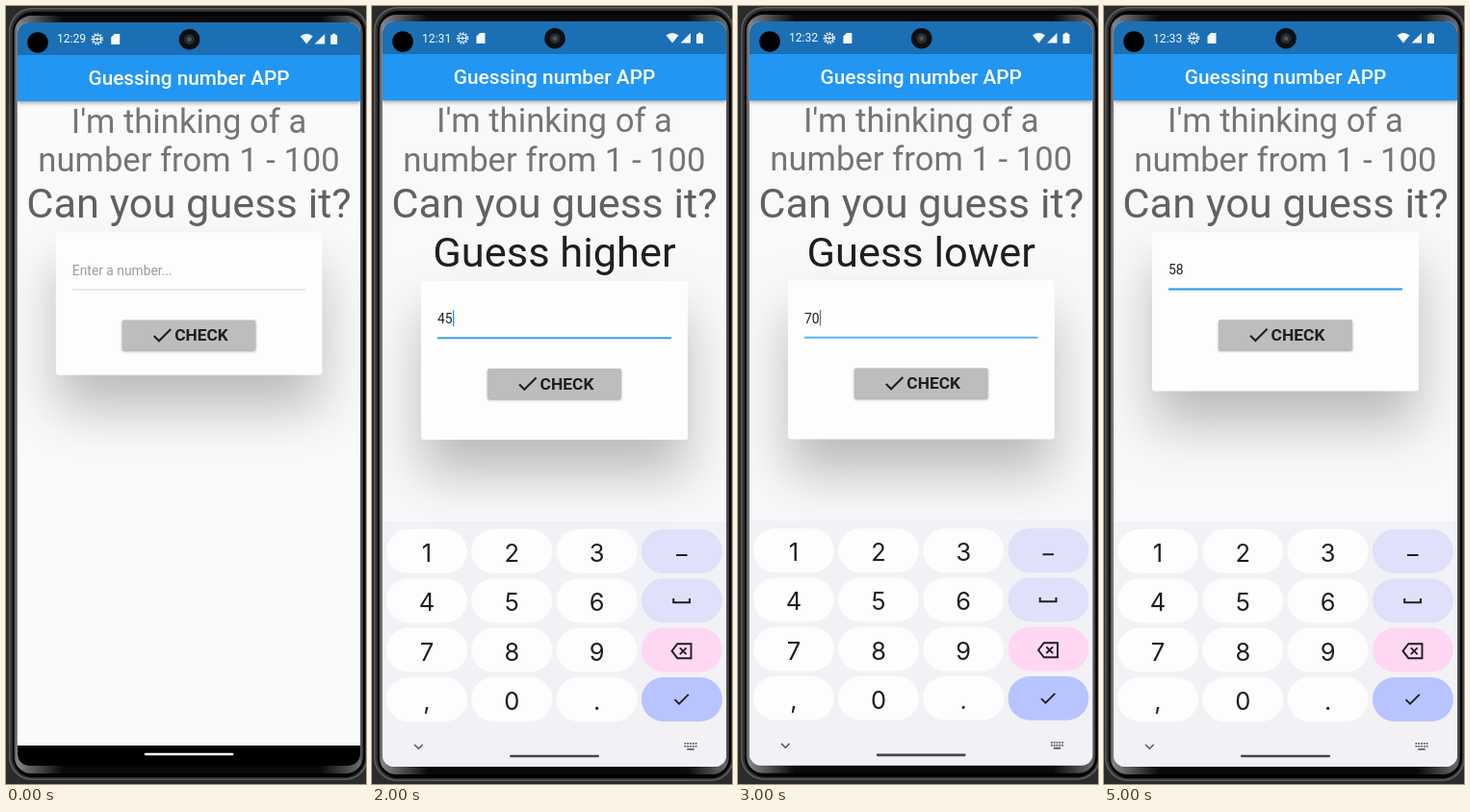
These frames come from a looping animation (374 px wide and 809 px high, 6 s). An HTML page with a canvas:

```html
<!DOCTYPE html>
<html lang="en">
<head>
<meta charset="utf-8">
<title>Guessing number</title>
<style>
  html, body { margin: 0; width: 100%; height: 100%; overflow: hidden; background: #2b2b2b; }
  canvas { display: block; }
</style>
</head>
<body>
<canvas id="stage" width="374" height="809"></canvas>
<script>
const ctx = document.getElementById('stage').getContext('2d');
const LEFT = 11, TOP = 16, WIDTH = 357, HEIGHT = 775, MIDDLE = 189.5;
const DP = 0.868; // stage pixels per device unit
const INK = '#1f1f1f', BLUE = '#2196f3';

// x, y, scale: where the phone sits; button and height are measured from the card's top
const scenes = [
  { x: 12, y: 17, scale: .9975, time: '12:29', line: '#d8d8d8', button: 91, height: 148 },
  { x: 11, y: 19, scale: .9947, time: '12:30', line: '#e57373', button: 109.5, height: 165, error: 'Enter a number!', keys: true },
  { x: 11, y: 16, scale: 1, time: '12:31', line: '#3c9fe6', button: 91, height: 165, message: 'Guess higher', value: '45', caret: BLUE, keys: true },
  { x: 12, y: 16, scale: .9985, time: '12:32', line: '#5db2f5', button: 91, height: 165, message: 'Guess lower', value: '70', caret: '#777', keys: true },
  { x: 11, y: 14.7, scale: 1, time: '12:33', line: '#55aef5', button: 91, height: 199, message: 'You got it right', value: '58', caret: BLUE, retry: true, weakSignal: true, keys: true },
  { x: 10, y: 16, scale: 1, time: '12:33', line: BLUE, button: 91, height: 165, value: '58', keys: true }
];

const icons = {
  check: 'M9 16.17L4.83 12l-1.42 1.41L9 19 21 7l-1.41-1.41z',
  restore: 'M14 12c0-1.1-.9-2-2-2s-2 .9-2 2 .9 2 2 2 2-.9 2-2zm-2-9c-4.97 0-9 4.03-9 9H0l4 4 4-4H5c0-3.87 3.13-7 7-7s7 3.13 7 7-3.13 7-7 7c-1.51 0-2.91-.49-4.06-1.3l-1.42 1.44C8.04 20.3 9.94 21 12 21c4.97 0 9-4.03 9-9s-4.03-9-9-9z'
};

function box(x, y, w, h, color, radius = 0) {
  ctx.fillStyle = color;
  ctx.beginPath();
  ctx.roundRect(x, y, w, h, radius);
  ctx.fill();
}

function disc(x, y, r, color) {
  box(x - r, y - r, 2 * r, 2 * r, color, r);
}

function text(string, x, y, size, color, { weight = 400, align = 'left', family = 'Roboto' } = {}) {
  ctx.font = `${weight} ${size}px ${family}, sans-serif`;
  ctx.textAlign = align;
  ctx.fillStyle = color;
  ctx.fillText(string, x, y);
}

function stroke(path, color, width = 2) {
  ctx.strokeStyle = color;
  ctx.lineWidth = width;
  ctx.stroke(new Path2D(path));
}

function fill(path, color) {
  ctx.fillStyle = color;
  ctx.fill(new Path2D(path));
}

function icon(name, x, y, size) {
  ctx.save();
  ctx.translate(x, y);
  ctx.scale(size / 24, size / 24);
  fill(icons[name], INK);
  ctx.restore();
}

function shaded(offset, blur, alpha, draw) {
  ctx.save();
  ctx.shadowColor = `rgba(0,0,0,${alpha})`;
  ctx.shadowOffsetY = offset;
  ctx.shadowBlur = blur;
  draw();
  ctx.restore();
}

function drawPhone() {
  box(2, 1, 374, 805, '#5c5c5c', 24);
  box(3.5, 2.5, 371, 802, '#303030', 23);
  box(6, 5, 367, 798, '#000', 21);
  // reflections along the curved sides of the glass
  const glass = ctx.createLinearGradient(7, 0, 371, 0);
  glass.addColorStop(0, '#444');
  glass.addColorStop(.01, '#858585');
  glass.addColorStop(.14, '#0a0a0a');
  glass.addColorStop(.88, '#0a0a0a');
  glass.addColorStop(.99, '#6a6a6a');
  glass.addColorStop(1, '#333');
  box(7.5, 9, 363.5, 790, glass, 18);
}

function drawStatusBar({ time, weakSignal }) {
  const white = '#f4f8fc';
  box(LEFT, TOP, WIDTH, 34, '#1b6fb5');
  text(time, 52, 37.5, 14 * DP, white);

  ctx.setLineDash([1.6, 1.54]);
  stroke('M99.5 33.5a5.5 5.5 0 1 1-11 0a5.5 5.5 0 1 1 11 0', white, 1.5);
  ctx.setLineDash([]);
  stroke('M98 33.5a4 4 0 1 1-8 0a4 4 0 1 1 8 0M90 33.5h8M94 31.5v4', white, 1.2);
  fill('M112 28h5.5v11h-9v-7.5z', white);

  fill('M305.5 30.5Q312 25.5 318.5 30.5L312 38.5z', white);
  if (weakSignal) {
    stroke('M330.3 29.5v8.3h-8z', white, 1.2);
    fill('M326 34v4h-4z', white);
  } else {
    fill('M331 28v10.5h-10.5z', white);
  }
  box(337, 29, 7, 10, white, 1);
  box(339, 27.8, 3, 2, white);

  disc(32, 37, 10.8, '#000');
  disc(190, 33.7, 10.8, '#0c0f12');
  disc(190, 33.7, 5.5, '#262b30');
  disc(190, 33.7, 2.5, '#4c5359');
}

function drawButton(y, name, label) {
  shaded(1.5, 2.5, .35, () => box(120, y, 139, 31.3, '#bdbdbd', 1.7));
  const size = 20 * DP, iconSize = 30 * DP;
  ctx.font = `700 ${size}px Roboto, sans-serif`;
  const start = MIDDLE - (iconSize + ctx.measureText(label).width) / 2;
  icon(name, start, y + 15.7 - iconSize / 2, iconSize);
  text(label, start + iconSize, y + 21.8, size, INK, { weight: 700 });
}

function drawCard(scene) {
  const { line, button, height, value, caret, error, message, retry } = scene;
  const y = message ? 286 : 235.3;
  shaded(35, 54, .25, () => box(51, y, 277, height, '#fff', 3));
  box(51, y, 277, height, '#fdfdfd', 3);

  text(value || 'Enter a number...', 68, y + 44, 16 * DP, value ? INK : '#9b9b9b');
  if (caret) box(84, y + 30.5, 1.3, 16.5, caret);
  const thickness = value ? 2 : 1.2;
  box(68, y + 59.3 - thickness / 2, 243, thickness, line);
  if (error) text(error, 68, y + 76.3, 12 * DP, '#d32f2f');

  drawButton(y + button, 'check', 'CHECK');
  if (retry) drawButton(y + button + 41.4, 'restore', 'Try Again');
}

function drawKeyboard() {
  box(LEFT, 536, WIDTH, 255, '#f2f1f6');
  const rows = ['123', '456', '789', ',0.'];
  const sideColors = ['#dfe0fa', '#dfe0fa', '#ffd7f2', '#b8c4ff'];
  rows.forEach((row, r) => {
    const y = 544 + r * 51.3;
    for (let c = 0; c < 4; c++) {
      const x = 15 + c * 88.3;
      box(x, y, 84, 46, c < 3 ? '#fdfdfd' : sideColors[r], 23);
      if (c < 3) text(row[c], x + 42, y + 33.9, 25.5, INK, { align: 'center', family: 'Inter' });
    }
  });
  stroke('M316 571h11.5', INK);
  stroke('M313.2 616v4.2h16.8v-4.2', INK);
  stroke('M317.3 663.2h14.2v15h-14.2l-5.8-7.5zM319.8 667.3l6.8 6.8m0-6.8l-6.8 6.8', INK, 1.9);
  stroke('M314.5 721.2l4.5 4.5l9.8-9.8', INK, 1.9);

  stroke('M44 768l4.3 4.3l4.3-4.3', '#55555a', 1.5);
  for (let i = 0; i < 5; i++) {
    box(324.5 + i * 2.8, 766, 1.8, 1.8, '#606066');
    box(324.5 + i * 2.8, 769, 1.8, 1.8, '#606066');
  }
  box(327.3, 772, 7.4, 1.8, '#606066');
  box(143, 778.7, 93, 2.6, '#45454a', 1.3);
}

function drawNavigation() {
  box(LEFT, 770, WIDTH, 21, '#000');
  box(143, 777.6, 93, 2.6, '#fff', 1.3);
}

function drawScene(scene) {
  ctx.resetTransform();
  box(0, 0, 374, 809, '#2b2b2b');
  ctx.save();
  ctx.translate(scene.x, scene.y);
  ctx.scale(scene.scale, scene.scale);
  ctx.translate(-LEFT, -TOP);
  drawPhone();

  ctx.beginPath();
  ctx.roundRect(LEFT, TOP, WIDTH, HEIGHT, 12);
  ctx.clip();
  box(LEFT, TOP, WIDTH, HEIGHT, scene.keys ? '#f9f9fc' : '#fafafa');
  drawCard(scene);
  shaded(2, 4, .35, () => box(LEFT, 50, WIDTH, 48.3, BLUE));
  drawStatusBar(scene);

  const centered = { align: 'center' };
  text('Guessing number APP', MIDDLE, 81.2, 24 * DP, '#fff', { align: 'center', weight: 500 });
  text("I'm thinking of a", MIDDLE, 131, 40 * DP, '#757575', centered);
  text('number from 1 - 100', MIDDLE, 171.7, 40 * DP, '#757575', centered);
  text('Can you guess it?', MIDDLE, 219.95, 50 * DP, '#616161', centered);
  if (scene.message) text(scene.message, MIDDLE, 270.9, 50 * DP, INK, centered);

  if (scene.keys) drawKeyboard();
  else drawNavigation();
  ctx.restore();
}

function tick() {
  drawScene(scenes[Math.floor(performance.now() % 6000 / 1000)]);
  requestAnimationFrame(tick);
}
tick();
</script>
</body>
</html>
```
